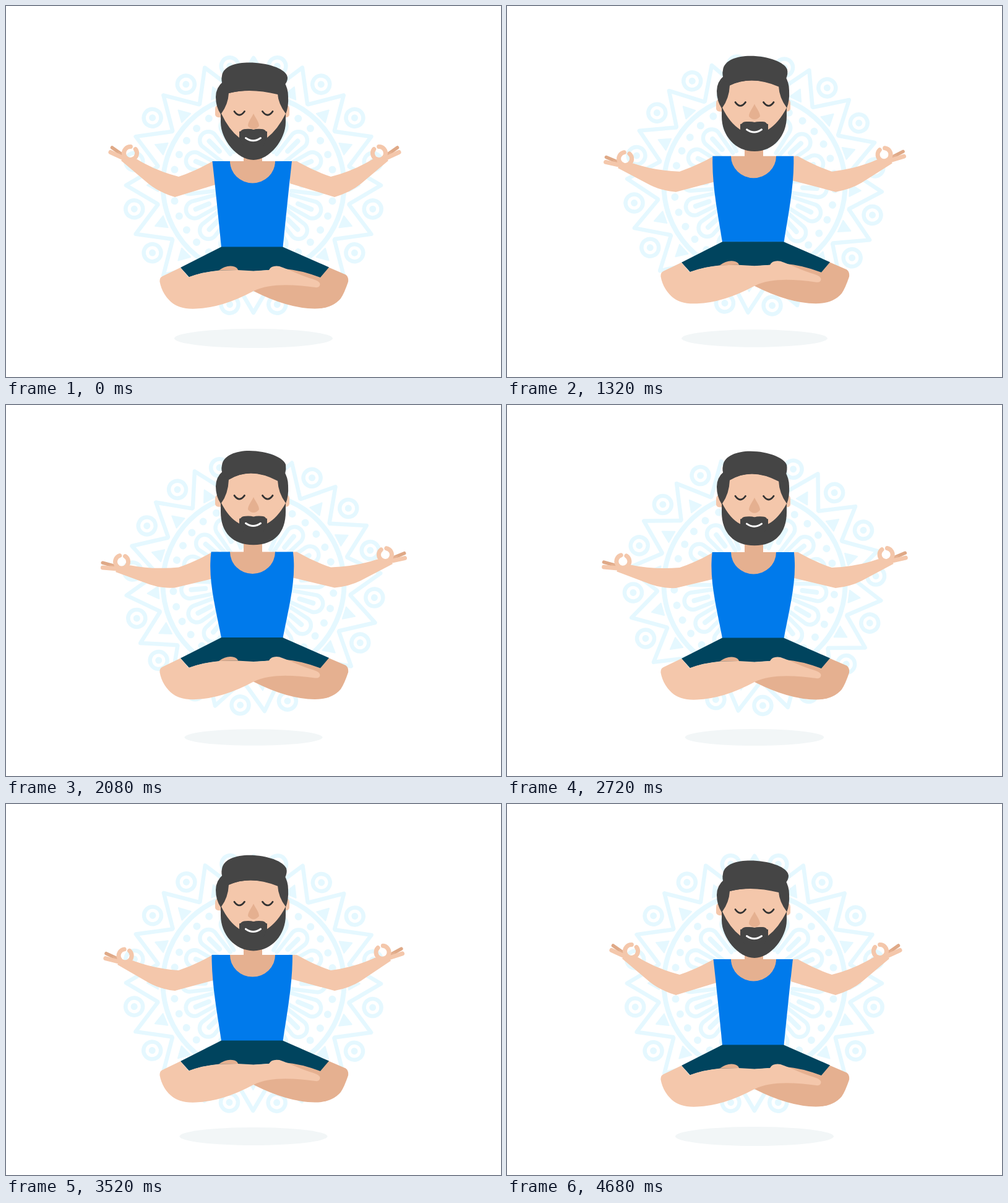
Recreate the animation shown at these times as an HTML page. Size 800 by 600 pixels, loop 4.72 s.

```html
<!DOCTYPE html>
<html lang="en">
<head>
<meta charset="utf-8">
<title>Levitating meditation</title>
<style>
  html, body { margin: 0; width: 100%; height: 100%; overflow: hidden; background: #fff; }
  svg { display: block; width: 100%; height: 100%; }
  .skin { fill: #f4c7ab; }
  .shade { fill: #e5b090; }
  .hair { fill: #454545; }
  .line { fill: none; stroke-linecap: round; stroke-linejoin: round; }
</style>
</head>
<body>
<svg viewBox="0 0 800 600">
  <defs>
    <g id="ray" class="line" stroke="#e5f8ff" stroke-width="6.5">
      <path d="M-30-155L0-206L30-155"/>
      <path d="M0-172L10-154H-10Z" fill="#e5f8ff" stroke-width="2"/>
      <path d="M-9-62L-14-103A14 14 0 0 1 14-103L9-62"/>
      <path d="M0-78V-101" stroke-width="8"/>
      <g fill="#e5f8ff" stroke="none">
        <circle cy="-130" r="6"/>
        <circle cy="-130" r="6" transform="rotate(11.25)"/>
      </g>
      <g transform="rotate(11.25)">
        <circle cy="-196.5" r="14"/>
        <circle cy="-196.5" r="5.5" fill="#e5f8ff" stroke="none"/>
      </g>
    </g>
    <g id="hand">
      <path class="line" stroke="#dfa987" stroke-width="5.5" d="M171.5 229L190 242"/>
      <path class="shade" d="M180 235L193 239L197 249L184 244Z"/>
      <path class="line" stroke="#f4c7ab" stroke-width="7" d="M169 236.5L194 248M201.4 227.500A10.5 10.5 0 1 0 209.3 231.5"/>
    </g>
  </defs>

  <g id="mandala">
    <circle r="146.5" class="line" stroke="#e5f8ff" stroke-width="8"/>
  </g>
  <ellipse id="shadow" cx="400" cy="537.5" fill="#f2f6f7"/>

  <g id="body">
    <g>
      <use id="leftHand" href="#hand"/>
      <path id="leftArm" class="skin"/>
    </g>
    <g transform="matrix(-1 0 0 1 804 0)">
      <use id="rightHand" href="#hand"/>
      <path id="rightArm" class="skin"/>
    </g>
    <path class="shade" d="M384 225H414V251H437V290H360V251H384Z"/>
    <path id="shirt" fill="#007aeb"/>
    <path class="shade" d="M520 422L549 434.5Q554 438 553 446Q547 464 541 473Q527 489.500 499 489.5Q455 489 400 461L424 425Z"/>
    <path fill="#00445e" d="M348 389.5H447L522 422.5L508 439Q476 427 450 425L400 429L345 428Q318 430 296 438.5L282 423Z"/>
    <path class="skin" d="M282 423L295 438.5Q318 430 345 427.5L374 427L400 428.5L425 427Q429 419 442 421C458 426 478 437 497 442Q507 445 507.5 450Q507 456 500 455C462 450 426 448 400 461Q350 488 307 489.5Q280 491 266 478Q252 465 248.5 446Q248 439 253 437Z"/>
    <path class="shade" d="M344 427.5Q357 418 369 421.5Q374 423 375 427Z"/>

    <g id="head">
      <path class="skin" d="M347 161Q338 159 338 167V176Q339 181 348 180ZM449 161Q458 159 458 167V176Q457 181 448 180Z"/>
      <path id="beard" class="hair"/>
      <path id="face" class="skin"/>
      <path id="moustache" class="hair"/>
      <path id="nose" class="shade" d="M400 174C403 181 409 187 409 194Q405 199 400 199T391 194C391 187 397 181 400 174Z"/>
      <path id="eyes" class="line" stroke="#333" stroke-width="2.8" d="M369 170.5Q377 182 385.5 170.5M414.5 170.5Q423 182 431 170.5"/>
      <path id="smile" class="line" stroke="#fff" stroke-width="3" d="M387.5 213.5Q399.5 222 411.5 213.5"/>
      <path id="quiff" class="hair"/>
    </g>
  </g>
</svg>
<script>
const LOOP = 4720, TURN = 4680;
const ELBOW = [276, 292];
const $ = id => document.getElementById(id);
const set = (id, name, value) => $(id).setAttribute(name, value);
const lift = (id, amount) => set(id, 'transform', `translate(0 ${-amount})`);

for (let i = 0; i < 16; i++) {
  $('mandala').insertAdjacentHTML('beforeend', `<use href="#ray" transform="rotate(${i * 22.5})"/>`);
}

// The elbow corners stay fixed while the wrist swings around the elbow.
function drawArm(side, u, degrees) {
  const angle = degrees * Math.PI / 180, [ex, ey] = ELBOW;
  const swing = (x, y) => {
    const dx = x - ex, dy = y - ey, c = Math.cos(angle), s = Math.sin(angle);
    return `${ex + dx * c - dy * s} ${ey + dx * s + dy * c}`;
  };
  set(side + 'Hand', 'transform', `rotate(${degrees} ${ex} ${ey})`);
  set(side + 'Arm', 'd', `M345 251H334Q306 267 279 276Q${swing(243, 267)} ${swing(212, 248)}
    L${swing(190, 246)} ${swing(186, 250)} ${swing(231, 288)}Q${swing(247, 301)} 273 309L345 ${287 + 5 * u}Z`);
}

function drawShirt(u) {
  const left = 333.5 - 2 * u, mid = 338.7 - 13 * u, low = 343.3 - 5.5 * u;
  const y1 = 297 - u, y2 = 343 - 5 * u;
  const flip = x => 795.5 - x;
  set('shirt', 'd', `M${left} 251H362A36.5 35.5 0 0 0 435 251H${flip(left)}
    C${flip(mid)} ${y1} ${flip(low)} ${y2} 447.5 390H348C${low} ${y2} ${mid} ${y1} ${left} 251Z`);
}

// Facial parts rise by different amounts, so the head seems to tilt back.
function drawHead(u) {
  const chin = 249 - 7.5 * u, brow = 141 - 5 * u, arch = 132 - 18 * u, top = 91.5 - 2 * u;
  const lip = 199 - 4 * u, cheek = 213 - 6 * u;
  const jawY = 216 + 6 * u, jawX = 26 + 8 * u;
  set('beard', 'd', `M351 122Q339 132 339 147Q339 163 347 175V188
    C347 ${jawY} ${400 - jawX} ${chin} 400 ${chin}S452 ${jawY} 452 188V175
    Q457 163 456 146Q456 133 449 122Z`);
  set('face', 'd', `M360 ${brow}Q395 ${arch} 439 ${brow + 1}Q440 158 452 174
    Q439 ${200 - 2 * u} 422 ${cheek}V${lip + 4}Q400 ${lip - 2} 377 ${lip + 4}V${cheek}
    Q360 ${200 - 2 * u} 348 174Q359 159 360 ${brow}Z`);
  // Mirror the jaw explicitly so both sides bulge equally.
  set('beard', 'd', $('beard').getAttribute('d').replace('S452', `C${400 + jawX} ${chin} 452`));
  set('moustache', 'd', `M378 ${cheek + 1}Q376 ${lip} 387 ${lip}Q396 ${lip - 0.5} 400 ${lip + 1}
    Q404 ${lip - 0.5} 413 ${lip}Q423 ${lip} 421 ${cheek + 1}L415 ${cheek + 16}H385Z`);
  set('quiff', 'd', `M351 129Q347 121 349 113C351 97 372 ${top} 393 ${top}
    C423 ${top} 449 101 ${454 - 2 * u} 112Q${457 - 4 * u} 119 451 127L450 ${143 - 5 * u}H439
    Q395 ${arch} 360 ${brow}Z`);
  lift('head', 2 * u);
  lift('eyes', 9 * u);
  lift('nose', 10 * u);
  lift('smile', 7 * u);
}

function draw(t) {
  const x = Math.max(0, 1 - Math.abs(1 - 2 * t / TURN));
  const u = x * x * (3 - 2 * x);
  set('mandala', 'transform', `translate(400 290) rotate(${90 * t / TURN})`);
  set('shadow', 'rx', 128 - 17 * u);
  set('shadow', 'ry', 15.5 - 2.2 * u);
  lift('body', 14 * u);
  drawArm('left', u, -20.8 * u);
  drawArm('right', u, -13 * u);
  drawShirt(u);
  drawHead(u);
}

const start = performance.now();
function tick() {
  draw((performance.now() - start) % LOOP);
  requestAnimationFrame(tick);
}
tick();
</script>
</body>
</html>
```
